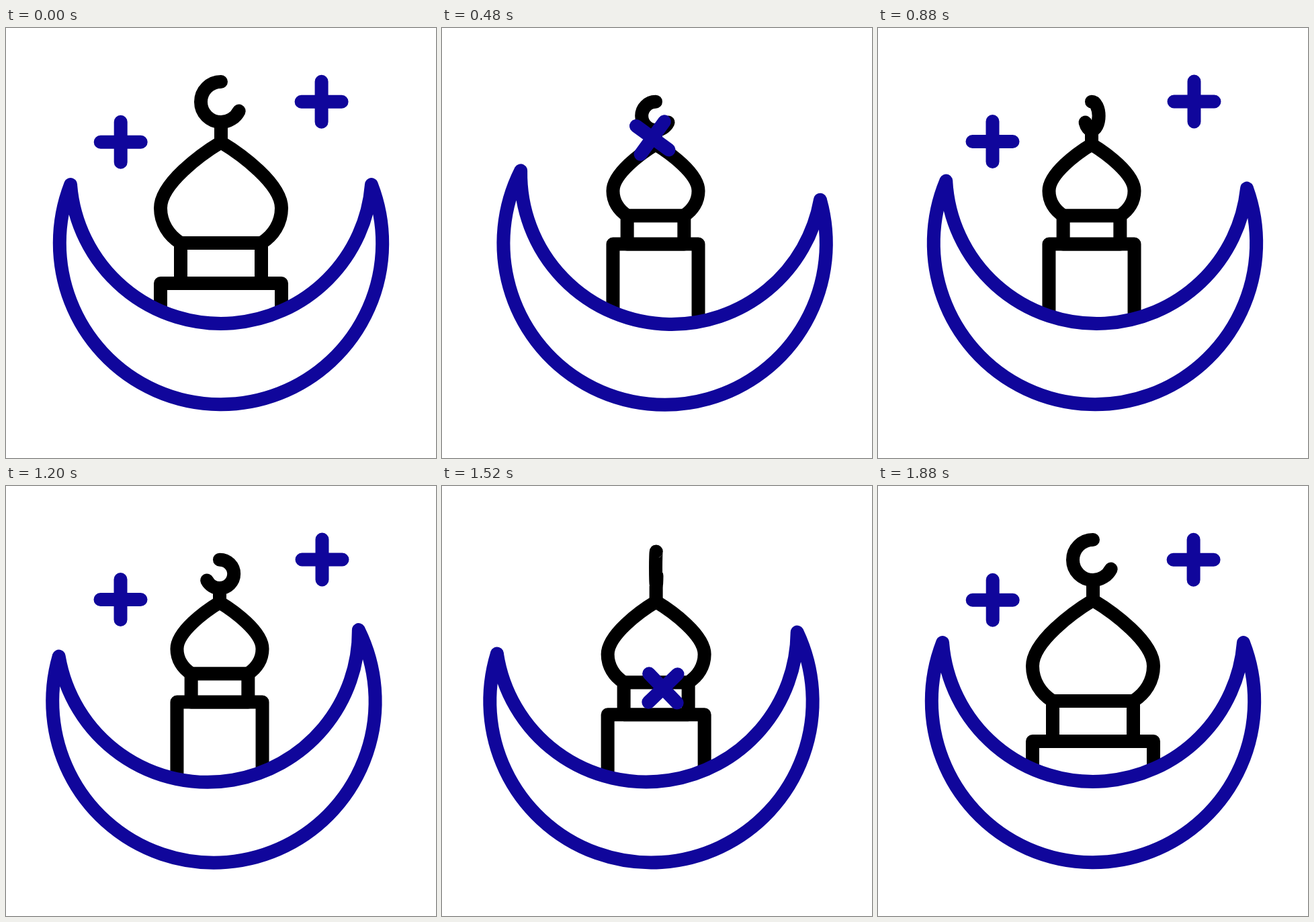
Animation, 640 px wide and 640 px high, one loop 2 s. Source, as an HTML page with a canvas:

```html
<!DOCTYPE html>
<html lang="en">
<head>
<meta charset="utf-8">
<title>Crescent and minaret</title>
<style>
html, body { margin: 0; width: 100%; height: 100%; overflow: hidden; background: #fff; }
canvas { display: block; width: 640px; height: 640px; }
</style>
</head>
<body>
<canvas id="stage" width="640" height="640"></canvas>
<script>
const ctx = document.getElementById('stage').getContext('2d');
const LOOP = 2000, STEP = 40;
const BLUE = '#10069b', BLACK = '#000', WHITE = '#fff';
const RAD = Math.PI / 180;

// eased progress from 0 to 1 between times a and b
function ease(t, a, b) {
  const s = Math.min(1, Math.max(0, (t - a) / (b - a)));
  return s * s * (3 - 2 * s);
}

function bezier(pts, u) {
  const v = 1 - u;
  const w = [v * v * v, 3 * v * v * u, 3 * v * u * u, u * u * u];
  return [0, 1].map(i => pts.reduce((sum, p, n) => sum + p[i] * w[n], 0));
}

function ink(color) {
  ctx.strokeStyle = color;
  ctx.stroke();
}

// resting places of the stars, at the ends and halfway through the loop
const left = [170.7, 169.7], right = [469.6, 109.8];
const left2 = [170.5, 169], right2 = [470.5, 109.5];

const frontOut = [right, [367, 165], [251, 179], left2];
const frontBack = [left2, [190, 370], [460, 342], right];
const backOut = [left, [190, 370], [460, 342], right2];
const backBack = [right2, [400, 255], [250, 275], left];

function star(t, out, back, dir) {
  const away = ease(t, 85, 880), home = ease(t, 1205, 1825);
  const [x, y] = home > 0 ? bezier(back, home) : bezier(out, away);
  const turn = home > 0 ? home : away - 0.76 * away * away * (1 - away);
  ctx.save();
  ctx.translate(x, y);
  ctx.rotate(dir * 90 * turn * RAD);
  ctx.beginPath();
  ctx.moveTo(-30, 0);
  ctx.lineTo(30, 0);
  ctx.moveTo(0, -30);
  ctx.lineTo(0, 30);
  ink(BLUE);
  ctx.restore();
}

// scales a path around a fixed point while the stroke keeps its width
function scaled(k, draw) {
  ctx.save();
  ctx.translate(313.2, 181);
  ctx.scale(k, k);
  ctx.translate(-313.2, -181);
  ctx.beginPath();
  draw();
  ctx.restore();
}

function dome() {
  ctx.moveTo(320, 170);
  ctx.bezierCurveTo(290, 188, 230, 232, 230, 268);
  ctx.bezierCurveTo(230, 290, 242, 309, 260, 320);
  ctx.lineTo(380, 320);
  ctx.bezierCurveTo(398, 309, 410, 290, 410, 268);
  ctx.bezierCurveTo(410, 232, 350, 188, 320, 170);
  ctx.closePath();
}

function base() {
  ctx.moveTo(230, 530);
  ctx.lineTo(230, 380);
  ctx.lineTo(410, 380);
  ctx.lineTo(410, 530);
}

function moon(flip) {
  ctx.translate(320, 110);
  ctx.scale(flip, 1);
  ctx.arc(0, 0, 30, -Math.PI / 2, 27 * RAD, true);
}

function minaret(t) {
  const shrink = ease(t, 85, 433);
  const size = 1 - 0.294 * (shrink - ease(t, 1335, 1825));
  const moonSize = 1 - 0.294 * (shrink - ease(t, 1280, 1825));
  let flip = 1 - 2 * (ease(t, 445, 1090) - ease(t, 1202, 1825));
  if (Math.abs(flip) < 0.03) flip = 0.03;

  for (const part of [base, () => ctx.rect(260, 320, 120, 60), dome]) {
    scaled(size, part);
    ctx.fillStyle = WHITE;
    ctx.fill();
    ink(BLACK);
  }
  scaled(size, () => {
    ctx.moveTo(320, 142);
    ctx.lineTo(320, 170);
  });
  ink(BLACK);
  scaled(moonSize, () => moon(flip));
  ink(BLACK);
}

function crescent(t) {
  const angle = 6 * ease(t, 87, 558) - 12 * ease(t, 550, 1335) + 6 * ease(t, 1335, 1825);
  const outer = Math.atan2(-87, 224), inner = Math.atan2(18, 224);
  ctx.save();
  ctx.translate(320, 440);
  ctx.rotate(angle * RAD);
  ctx.translate(-320, -440);
  ctx.beginPath();
  ctx.arc(320, 320, 240.2, outer, Math.PI - outer);
  ctx.arc(320, 215.2, 224.7, Math.PI - inner, inner, true);
  ctx.closePath();
  ctx.fillStyle = WHITE;
  ctx.fill();
  ink(BLUE);
  ctx.restore();
}

function draw(now) {
  const t = Math.floor((now % LOOP) / STEP) * STEP;
  ctx.fillStyle = WHITE;
  ctx.fillRect(0, 0, 640, 640);
  ctx.lineWidth = 20;
  ctx.lineCap = ctx.lineJoin = 'round';
  star(t, backOut, backBack, -1);
  minaret(t);
  crescent(t);
  star(t, frontOut, frontBack, 1);
}

let start = null;
function tick(now) {
  if (start === null) start = now;
  draw(now - start);
  requestAnimationFrame(tick);
}
draw(0);
requestAnimationFrame(tick);
</script>
</body>
</html>
```
